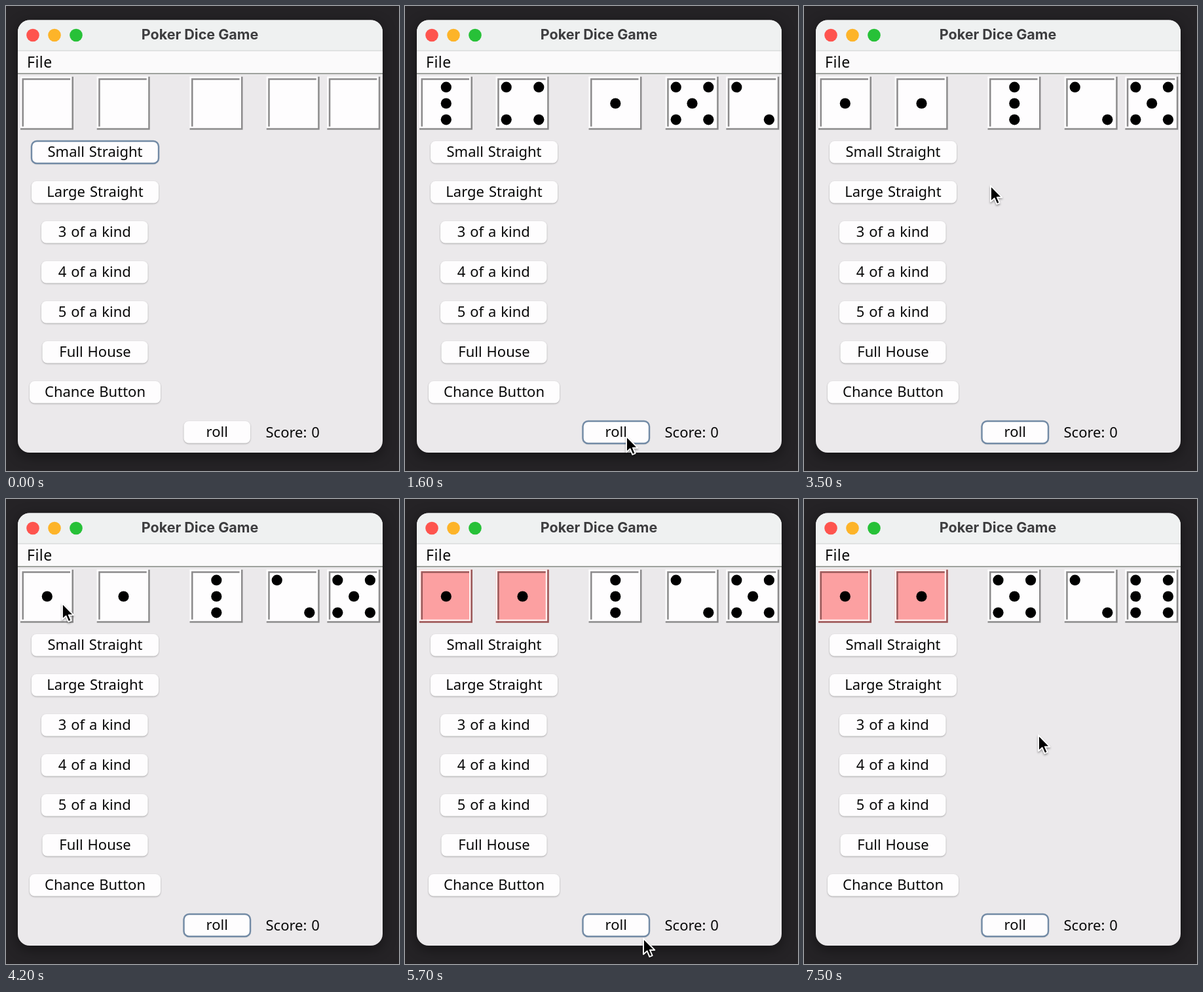
An HTML page for the animation above (7.6 s loop, 600x709 px).

```html
<!DOCTYPE html>
<html lang="en">
<head>
<meta charset="utf-8">
<title>Poker Dice Game</title>
<style>
  html, body { margin: 0; width: 100%; height: 100%; overflow: hidden; background: #252326; }
  svg { display: block; width: 600px; height: 709px; user-select: none; }
  text { font: 22px "Noto Sans", "Open Sans", sans-serif; word-spacing: 1.2px; fill: #080808; }
  .title { font: 700 21.5px Inter, "Liberation Sans", sans-serif; word-spacing: 0; fill: #3d3d3f; }
  .menu { font-size: 23px; letter-spacing: .5px; }
  .mid { text-anchor: middle; }
  #window { filter: drop-shadow(0 5px 10px rgba(0, 0, 0, .45)); }
  .button { fill: #fefdfe; filter: drop-shadow(0 1px .8px rgba(0, 0, 0, .28)); }
  .ring { fill: none; stroke: #728aa5; stroke-width: 2.4; }
  #cursor { filter: drop-shadow(0 2px 1.5px rgba(0, 0, 0, .35)); }
</style>
</head>
<body>
<svg id="stage" viewBox="0 0 600 709">
  <defs>
    <clipPath id="frame"><rect x="18" y="21.5" width="557" height="659.5" rx="18"/></clipPath>
  </defs>
  <g id="window">
    <g clip-path="url(#frame)">
      <rect x="18" y="21" width="557" height="660" fill="#ebe9eb"/>
      <rect x="18" y="21" width="557" height="47" fill="#eff1f1"/>
      <rect x="18" y="67.5" width="557" height="1.5" fill="#dcdddd"/>
      <rect x="18" y="69" width="557" height="33.5" fill="#fbfafb"/>
      <rect x="18" y="102.3" width="557" height="1.5" fill="#858a84"/>
    </g>
  </g>
  <circle cx="41" cy="44.5" r="9.8" fill="#fe544e"/>
  <circle cx="74" cy="44.5" r="9.8" fill="#fdb429"/>
  <circle cx="107" cy="44.5" r="9.8" fill="#27c138"/>
  <text class="title mid" x="296" y="51">Poker Dice Game</text>
  <text class="menu" x="32" y="94">File</text>
  <g id="dice"></g>
  <g id="buttons"></g>
  <text x="396.5" y="658">Score: 0</text>
  <path id="cursor" d="M0 0V24.2L5.6 19.2L9.4 28L13.6 26.2L9.9 17.7H17.2Z"
        transform="translate(-99 -99)" fill="#000" stroke="#fff" stroke-width="1.9" stroke-linejoin="round"/>
</svg>
<script>
const LOOP = 7600, STEP = 100;
const $ = id => document.getElementById(id);

function add(parent, tag, attrs) {
  const el = document.createElementNS("http://www.w3.org/2000/svg", tag);
  for (const key in attrs) el.setAttribute(key, attrs[key]);
  return parent.appendChild(el);
}

// Buttons: label, left, right, top
const buttons = [
  ["Small Straight", 39, 233, 206],
  ["Large Straight", 39, 233, 267],
  ["3 of a kind", 54, 216.5, 328],
  ["4 of a kind", 54, 216.5, 389],
  ["5 of a kind", 54, 216.5, 450],
  ["Full House", 55.5, 216.5, 511],
  ["Chance Button", 36, 236, 572],
  ["roll", 271.5, 373, 633]
].map(([label, left, right, top]) => {
  const g = add($("buttons"), "g", {});
  const width = right - left;
  const face = add(g, "rect", { class: "button", x: left, y: top, width, height: 33.5, rx: 7.5 });
  const ring = add(g, "rect", { class: "ring", x: left, y: top, width, height: 34, rx: 8 });
  add(g, "text", { class: "mid", x: (left + right) / 2, y: top + 24 }).textContent = label;
  return { face, ring };
});
const small = buttons[0], roll = buttons[7];

// Dice with an etched border two lines thick
const SIZE = 81, LINE = 2.5;
const spots = [[-1, -1], [1, -1], [-1, 0], [0, 0], [1, 0], [-1, 1], [1, 1], [0, -1], [0, 1]];
const faces = ["", "3", "06", "378", "0156", "01356", "012456"];

const dice = [22, 138.7, 280.5, 397.7, 490.3].map(left => {
  const g = add($("dice"), "g", { transform: `translate(${left} 107.7)` });
  const a = LINE / 2, b = LINE * 1.5, end = SIZE - a;
  const face = add(g, "rect", { width: SIZE, height: SIZE });
  const border = d => add(g, "path", { d, fill: "none", "stroke-width": LINE });
  const light = border(`M${a} ${a}H${SIZE - b}V${SIZE - b}H${a}Z`);
  const dark = border(`M${b} ${SIZE - 2 * LINE}V${b}H${SIZE - 2 * LINE}M0 ${end}H${end}V0`);
  const pips = spots.map(([x, y]) =>
    add(g, "circle", { cx: 40.8 + x * 24.8, cy: 40.8 + y * 24.8, r: 8.1 }));
  return { face, light, dark, pips };
});

function showDie(die, value, held) {
  die.face.setAttribute("fill", held ? "#fca0a1" : "#fefdfe");
  die.light.setAttribute("stroke", held ? "#fff0ef" : "#fcfbfc");
  die.dark.setAttribute("stroke", held ? "#995a5a" : "#8b8a8b");
  die.pips.forEach((pip, i) =>
    pip.setAttribute("visibility", faces[value].includes(i) ? "visible" : "hidden"));
}

const rolls = [
  [0, "00000"], [1600, "34152"], [2000, "61266"], [2400, "25431"],
  [2800, "43614"], [3200, "11325"], [6700, "11643"], [7000, "11526"]
];
const holds = [4500, 5100];
const presses = [[1400, 1600], [6400, 6600]];

// Pointer: time, x, y
const path = [
  [400, 453, 629], [700, 453, 629], [1000, 338, 656], [1600, 338, 656],
  [2000, 285, 274], [3700, 285, 274], [4300, 70, 150], [4600, 70, 150],
  [4800, 105, 152], [5000, 183, 156], [5200, 183, 156], [5700, 364, 670],
  [6100, 353, 642], [6700, 353, 642], [7000, 355, 556], [7400, 358, 360], [7600, 358, 360]
];

function pointerAt(t) {
  const i = path.findIndex(p => p[0] > t);
  if (i < 1) return [-99, -99];
  const [t0, x0, y0] = path[i - 1], [t1, x1, y1] = path[i];
  const u = (t - t0) / (t1 - t0), k = u * u * (3 - 2 * u);
  return [x0 + (x1 - x0) * k, y0 + (y1 - y0) * k];
}

function draw(t) {
  const values = rolls.filter(r => r[0] <= t).pop()[1];
  dice.forEach((die, i) => showDie(die, +values[i], t >= holds[i]));

  const used = t >= presses[0][0];
  const pressed = presses.some(([from, to]) => t >= from && t < to);
  small.ring.setAttribute("visibility", used ? "hidden" : "visible");
  roll.ring.setAttribute("visibility", used ? "visible" : "hidden");
  roll.face.style.fill = pressed ? "#e9eef2" : "";

  $("cursor").setAttribute("transform", `translate(${pointerAt(t)})`);
}

buttons.forEach(b => b.ring.setAttribute("visibility", "hidden"));
const start = performance.now();
let last = -1;

function tick() {
  const elapsed = Math.max(0, performance.now() - start) % LOOP;
  const t = Math.floor(elapsed / STEP) * STEP;
  if (t !== last) draw(last = t);
  requestAnimationFrame(tick);
}
tick();
</script>
</body>
</html>
```
